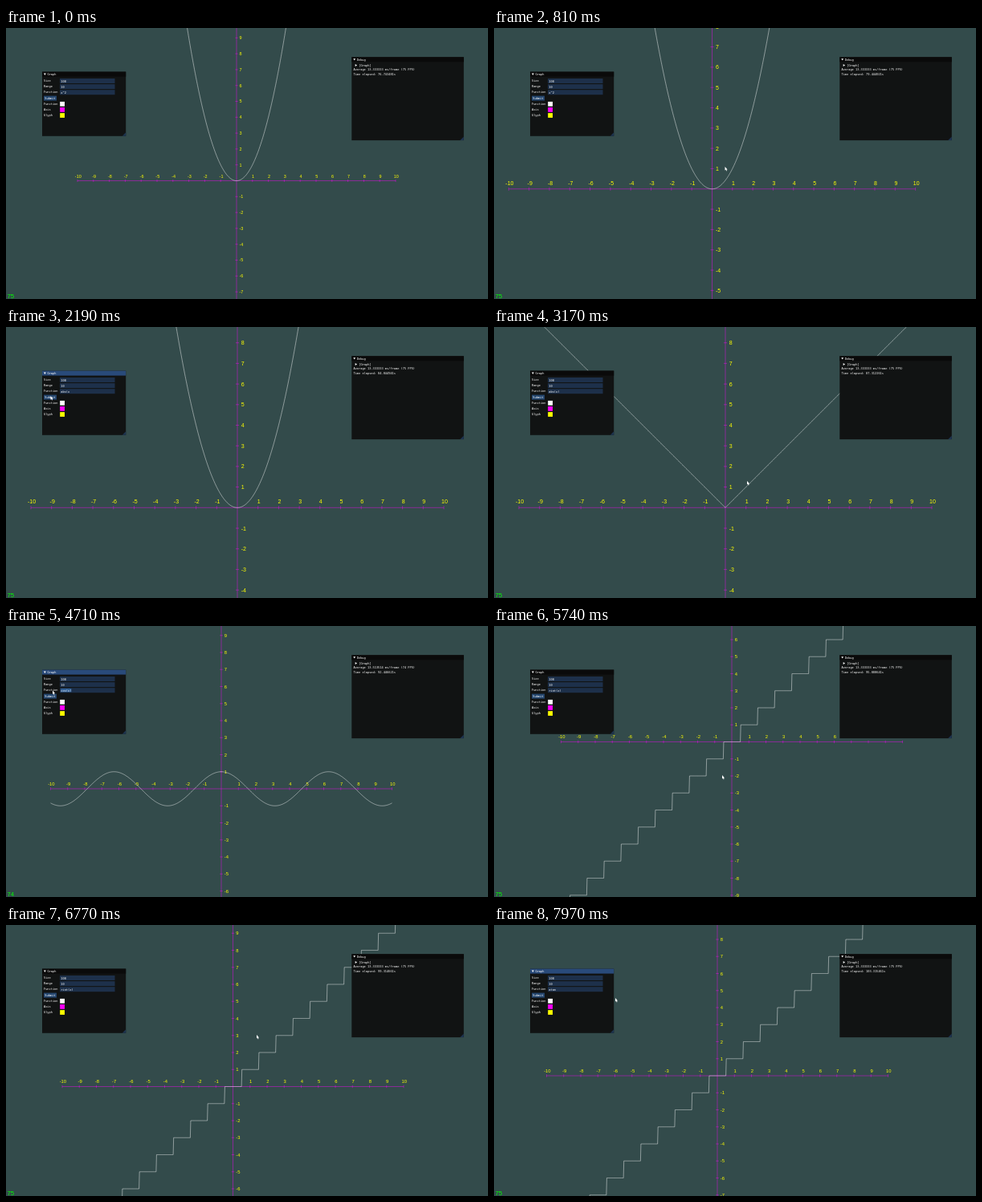
Animation, 600 px wide and 338 px high, one loop 8 s. Source, as an HTML page with a canvas:

```html
<!DOCTYPE html>
<html>
<head>
<meta charset="utf-8">
<title>Function graph</title>
<style>
  html, body { margin: 0; width: 100%; height: 100%; overflow: hidden; background: #334b4b; }
  canvas { display: block; }
</style>
</head>
<body>
<canvas width="600" height="338"></canvas>
<script>
const ctx = document.querySelector('canvas').getContext('2d');
const LOOP = 8000;
const UI_SCALE = 0.3125; // the interface is laid out on a 1920 px wide screen
const SANS = '"Liberation Sans", Arial, sans-serif';
const ROW = 7.1;

// Camera: origin and pixels per unit, eased from one view to the next
const moves = [
  { from: 0, to: 1, x: 287, y: 190.5, unit: 19.8 },
  { from: 200, to: 1460, x: 254.5, y: 212, unit: 31.35 },
  { from: 1460, to: 1700, x: 288, y: 225.3, unit: 25.7 },
  { from: 3250, to: 3400, x: 268, y: 203, unit: 21.25 },
  { from: 5690, to: 5740, x: 296, y: 144.5, unit: 21.25 },
  { from: 5740, to: 5900, x: 368, y: 130, unit: 21.25 },
  { from: 5950, to: 6500, x: 282.5, y: 201.5, unit: 21.25 },
  { from: 7000, to: 7250, x: 278, y: 188, unit: 21.25 }
];

// Each edit selects the old formula, types a new one and submits it;
// then the pointer visits the rest points [time, x, y].
const SELECT_TIME = 150, KEY_TIME = 55;
const edits = [
  { start: -1000, text: 'x^2', fn: x => x * x, rests: [[0, 287.5, 173]] },
  { start: 1750, text: 'abs(x)', fn: Math.abs, rests: [[2550, 315, 192]] },
  { start: 3420, text: 'cos(x)', fn: Math.cos, rests: [[4250, 270, 190]] },
  { start: 4660, text: 'rint(x)', fn: x => Math.round(x - 1e-6), rests: [[5740, 284, 186], [6500, 312, 137]] },
  { start: 7590, text: 'atan(x)', fn: Math.atan, rests: [[7970, 151, 91]] }
];
edits.forEach(e => e.submit = e.start + SELECT_TIME + (e.text.length + 1) * KEY_TIME);

const FIELD = [58, 80.5], BUTTON = [55, 87];
const pointerPath = edits.flatMap((e, i) => [
  ...(i ? [[e.start - 150, ...edits[i - 1].rests.at(-1).slice(1)]] : []),
  [e.start, ...FIELD],
  [e.start + SELECT_TIME, ...FIELD],
  ...(e.submit < LOOP ? [[e.submit, ...BUTTON]] : []),
  ...e.rests
]);

const mix = (a, b, p) => a + (b - a) * p;
const smooth = p => p * p * (3 - 2 * p);

function viewAt(t) {
  const i = moves.findLastIndex(m => t >= m.from);
  const next = moves[i], last = moves[Math.max(0, i - 1)];
  const p = smooth(Math.min(1, (t - next.from) / (next.to - next.from)));
  return ['x', 'y', 'unit'].map(key => mix(last[key], next[key], p));
}

function pointerAt(t) {
  const i = pointerPath.findLastIndex(k => t >= k[0]);
  const a = pointerPath[i], b = pointerPath[i + 1] || a;
  const p = smooth((t - a[0]) / (b[0] - a[0] || 1));
  return [mix(a[1], b[1], p), mix(a[2], b[2], p)];
}

function rect(x, y, w, h, color) {
  ctx.fillStyle = color;
  ctx.fillRect(x, y, w, h);
}

function polygon(color, ...points) {
  ctx.fillStyle = color;
  ctx.beginPath();
  points.forEach(([x, y]) => ctx.lineTo(x, y));
  ctx.fill();
}

function text(str, x, y, font, color, align = 'left') {
  ctx.font = font;
  ctx.fillStyle = color;
  ctx.textAlign = align;
  ctx.fillText(str, x, y);
}

// Interface text, placed by its left edge and vertical middle
function label(str, x, y) {
  ctx.save();
  ctx.translate(x, y + 1.35);
  ctx.scale(UI_SCALE, UI_SCALE);
  text(str, 0, 0, '11.63px "DejaVu Sans Mono", monospace', '#fff');
  ctx.restore();
}

function drawAxes(ox, oy, u) {
  const font = `${0.275 * u}px ${SANS}`;
  const tick = 0.08 * u;
  ctx.strokeStyle = '#f0f';
  ctx.lineWidth = 0.42;
  ctx.beginPath();
  ctx.moveTo(ox - 10 * u, oy);
  ctx.lineTo(ox + 10 * u, oy);
  ctx.moveTo(ox, oy - 10 * u);
  ctx.lineTo(ox, oy + 10 * u);
  for (let n = -10; n <= 10; n++) {
    if (!n) continue;
    const x = ox + n * u, y = oy - n * u;
    ctx.moveTo(x, oy - tick);
    ctx.lineTo(x, oy + tick);
    ctx.moveTo(ox - tick, y);
    ctx.lineTo(ox + tick, y);
    text(n, x + 0.04 * u, oy - 0.19 * u, font, '#ff0', 'center');
    text(n, ox + 0.18 * u, y + 0.1 * u, font, '#ff0');
  }
  ctx.stroke();
}

function drawCurve(fn, ox, oy, u) {
  ctx.strokeStyle = '#fff';
  ctx.lineWidth = 0.45;
  ctx.beginPath();
  for (let i = -400; i <= 400; i++) {
    const x = i / 40;
    ctx.lineTo(ox + x * u, oy - fn(x) * u);
  }
  ctx.stroke();
}

function drawWindow(title, x, y, w, h, active) {
  rect(x, y, w, h, '#111313');
  rect(x, y, w, 6, active ? '#294a7a' : '#0a0a0a');
  polygon('#fff', [x + 2, y + 1.9], [x + 4.8, y + 1.9], [x + 3.4, y + 4.3]);
  label(title, x + 6.5, y + 3.1);
  polygon('#1e3450', [x + w, y + h - 4.5], [x + w, y + h], [x + w - 4.5, y + h]);
}

function drawGraphWindow(t, edit, selected) {
  const typed = Math.floor((t - edit.start - SELECT_TIME) / KEY_TIME);
  const value = selected || edit.text.slice(0, Math.max(0, typed));

  drawWindow('Graph', 45, 54.6, 104.2, 80.2, t < edit.submit);
  Object.entries({ Size: '100', Range: '10', Function: value }).forEach(([name, content], i) => {
    const y = 66 + i * ROW;
    label(name, 47, y - 0.2);
    rect(67, y - 3, 68.5, 6, '#1d304a');
    if (content === selected) rect(68.2, y - 2.2, content.length * 2.19, 4.4, '#315f94');
    label(content, 68.3, y + 0.2);
  });
  rect(47, 84.6, 16, 6, '#24466e');
  label('Submit', 48.3, 87.6);
  Object.entries({ Function: '#fff', Axis: '#f0f', Glyph: '#ff0' }).forEach(([name, color], i) => {
    const y = 94.7 + i * ROW;
    label(name, 47, y - 0.3);
    rect(67.2, y - 2.8, 5.8, 5.8, color);
  });
}

function drawDebugWindow(t, fps) {
  drawWindow('Debug', 430.3, 36.3, 139.5, 103.8, false);
  polygon('#fff', [434.7, 45.1], [434.7, 47.9], [437, 46.5]);
  label('[Graph]', 439.2, 46.6);
  label(`Average ${(1000 / fps).toFixed(6)} ms/frame (${fps} FPS)`, 432.5, 52);
  label(`Time elapsed: ${(76.740147 + t * 0.003334).toFixed(6)}s`, 432.5, 57.5);
}

function drawPointer(x, y) {
  polygon('#fff', [x, y], [x, y + 4.6], [x + 1, y + 3.8], [x + 1.8, y + 5.4],
    [x + 2.5, y + 5], [x + 1.9, y + 3.5], [x + 3.1, y + 3.4]);
}

function draw(now) {
  const t = now % LOOP;
  const view = viewAt(t);
  const index = edits.findLastIndex(e => t >= e.start);
  const edit = edits[index];
  const selected = t < edit.start + SELECT_TIME ? edits[index - 1].text : '';
  const fps = selected ? 74 : 75;

  rect(0, 0, 600, 338, '#334b4b');
  drawAxes(...view);
  drawCurve(edits.findLast(e => t >= e.submit).fn, ...view);
  text(fps, 1.5, 336.6, `7.8px ${SANS}`, '#0f0');
  drawGraphWindow(t, edit, selected);
  drawDebugWindow(t, fps);
  if (t > 250) drawPointer(...pointerAt(t));
}

const begin = performance.now();
function tick() {
  draw(performance.now() - begin);
  requestAnimationFrame(tick);
}
tick();
</script>
</body>
</html>
```
